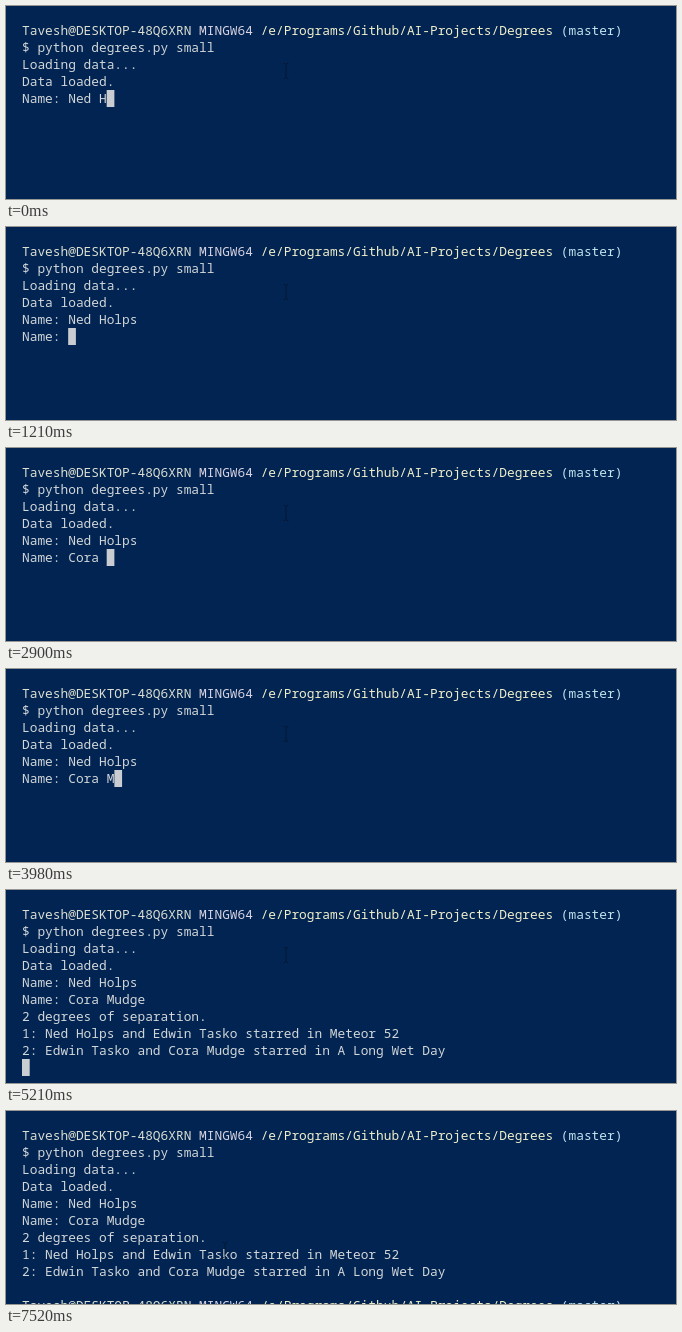
Recreate the animation shown at these times as an HTML page. Size 670 by 193 pixels, loop 8 s.

```html
<!DOCTYPE html>
<html lang="en">
<head>
<meta charset="utf-8">
<title>Degrees of separation</title>
<style>
  html, body { margin: 0; width: 100%; height: 100%; overflow: hidden; background: #012452; }
  svg { display: block; }
  text { font: 12.83px "Noto Sans Mono", monospace; white-space: pre; fill: #d2d6d8; }
  .user { fill: #dcdfd2; }
  .system { fill: #d8d3e2; }
  .path { fill: #f0efcb; }
  .branch { fill: #c3e4ee; }
  #caret { fill: #c9cdd1; }
  #pointer { fill: none; stroke: #08101f; stroke-opacity: .6; }
</style>
</head>
<body>
<svg width="670" height="193" viewBox="0 0 670 193">
  <defs>
    <text id="prompt" x="16"><tspan class="user">Tavesh@DESKTOP-48Q6XRN</tspan> <tspan class="system">MINGW64</tspan> <tspan class="path">/e/Programs/Github/AI-Projects/Degrees</tspan> <tspan class="branch">(master)</tspan></text>
  </defs>
  <use href="#prompt" y="28.6"/>
  <g id="rows"></g>
  <use id="nextPrompt" href="#prompt" y="198.6"/>
  <rect id="caret" width="7.7" height="17"/>
  <path id="pointer" d="M-2.5-7.5H-1L0-6.5 1-7.5H2.5M0-6.5V6.5M-2.5 7.5H-1L0 6.5 1 7.5H2.5"/>
</svg>
<script>
const LOOP = 8000, LEFT = 16, TOP = 16, LINE = 17, BASELINE = 12.6, CHAR = 7.698;
const PROMPT_BACK = 5290;

// Each entry appends its text to the terminal at the given time.
const output = [
  [0, '\n$ python degrees.py small\nLoading data...\nData loaded.\nName: Ned H'],
  [440, 'o'], [600, 'l'], [750, 'p'], [900, 's'], [1130, '\nName: '],
  [1820, 'C'], [2130, 'o'], [2360, 'r'], [2590, 'a'], [2820, ' '],
  [3150, 'M'], [4060, 'u'], [4290, 'd'], [4520, 'g'], [4750, 'e'],
  [5060, '\n'],
  [5140, '2 degrees of separation.\n' +
    '1: Ned Holps and Edwin Tasko starred in Meteor 52\n' +
    '2: Edwin Tasko and Cora Mudge starred in A Long Wet Day\n']
];

// Pointer positions: time, x, y.
const jumps = [
  [0, 280, 65], [6210, 400, 62], [6290, 460, 60], [6520, 520, 61], [6600, 556, 61]
];
const glide = { start: 6800, end: 7520, from: [556, 61], to: [219, 139] };

const find = id => document.getElementById(id);
const caret = find('caret'), pointer = find('pointer'), nextPrompt = find('nextPrompt');

const rows = Array.from({ length: 10 }, (_, i) => {
  const row = document.createElementNS('http://www.w3.org/2000/svg', 'text');
  row.setAttribute('x', LEFT);
  row.setAttribute('y', TOP + i * LINE + BASELINE);
  find('rows').append(row);
  return row;
});

function pointerAt(t) {
  if (t < glide.start) return jumps.filter(([time]) => time <= t).pop().slice(1);
  const p = Math.min(1, (t - glide.start) / (glide.end - glide.start));
  const eased = p * p * (3 - 2 * p);
  return glide.from.map((v, i) => v + (glide.to[i] - v) * eased);
}

function draw(t) {
  const lines = output.filter(([time]) => time <= t).map(([, text]) => text).join('').split('\n');
  rows.forEach((row, i) => {
    const line = lines[i] || '';
    if (row.textContent !== line) row.textContent = line;
  });

  const last = lines.length - 1;
  caret.setAttribute('x', LEFT + lines[last].length * CHAR);
  caret.setAttribute('y', TOP + last * LINE);

  const finished = t >= PROMPT_BACK;
  caret.style.display = finished ? 'none' : '';
  nextPrompt.style.display = finished ? '' : 'none';

  pointer.setAttribute('transform', `translate(${pointerAt(t)})`);
}

const begin = performance.now();
function tick() {
  draw((performance.now() - begin) % LOOP);
  requestAnimationFrame(tick);
}
tick();
</script>
</body>
</html>
```
